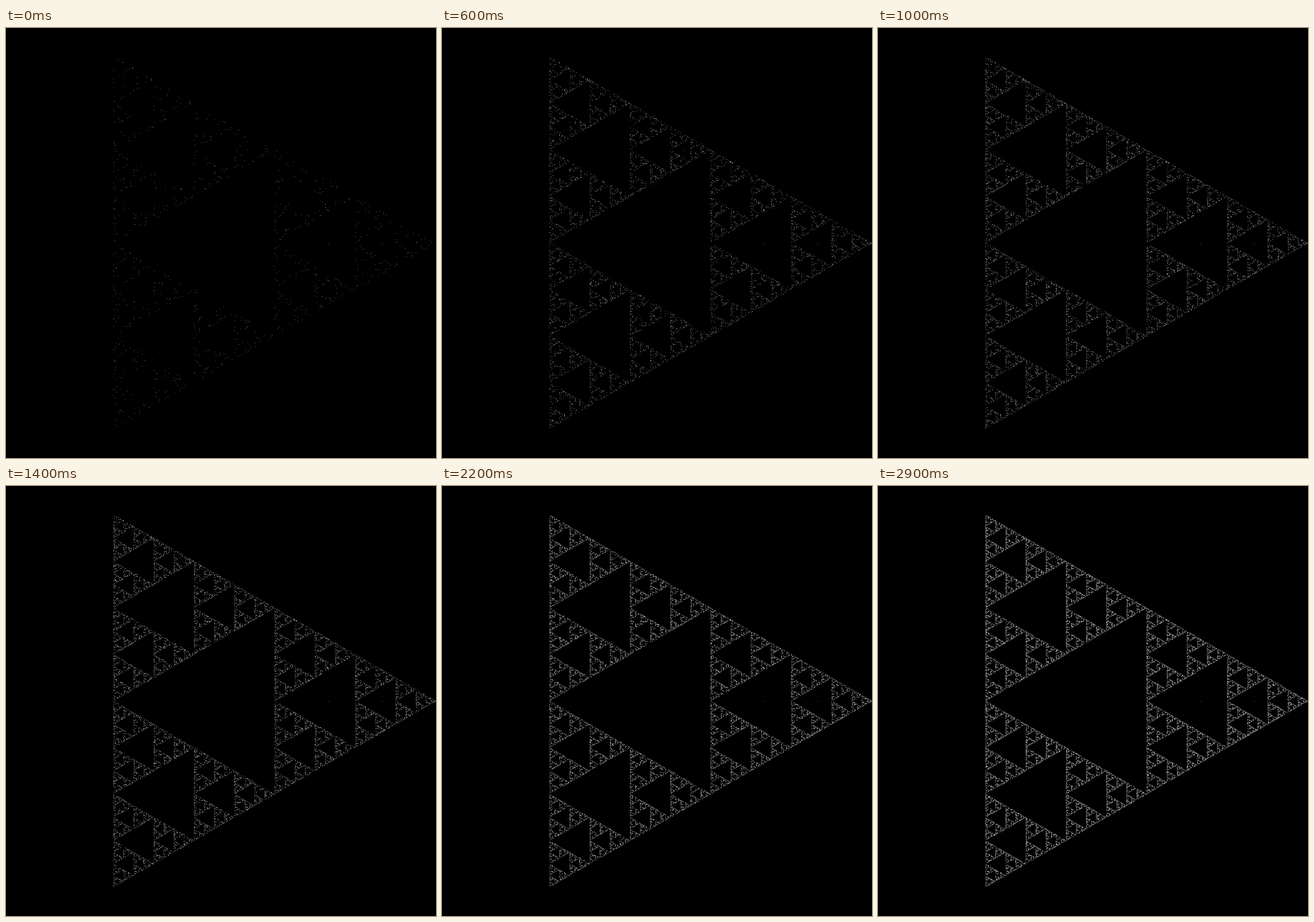
Write an HTML page with a canvas that moves like this. It is 748 by 748 pixels and loops after 3000 ms.

```html
<!DOCTYPE html>
<html lang="en">
<head>
<meta charset="utf-8">
<title>Chaos game triangle</title>
<style>
html, body { margin: 0; width: 100%; height: 100%; overflow: hidden; background: #000; }
canvas { display: block; width: 748px; height: 748px; }
</style>
</head>
<body>
<canvas id="stage" width="748" height="748"></canvas>
<script>
const SIZE = 748, HALF = SIZE / 2;
const LOOP = 3000, STEP = 100, PER_STEP = 1000;
const BLACK = 0xff000000, ALPHA = 100 / 255;

const ctx = document.getElementById('stage').getContext('2d');
const image = ctx.createImageData(SIZE, SIZE);
const pixels = new Uint32Array(image.data.buffer);

function seeded(seed) {
  return () => {
    seed = (seed + 0x6d2b79f5) | 0;
    let t = Math.imul(seed ^ (seed >>> 15), 1 | seed);
    t = (t + Math.imul(t ^ (t >>> 7), 61 | t)) ^ t;
    return ((t ^ (t >>> 14)) >>> 0) / 4294967296;
  };
}

// Corners: right, bottom left, top left
const corners = [0, 1, 2].map(i => {
  const a = i * Math.PI * 2 / 3;
  return [HALF + HALF * Math.cos(a), HALF + HALF * Math.sin(a)];
});

// Each point lies halfway between the previous one and a random corner
function chaosGame(count) {
  const rand = seeded(20);
  const opening = [0, 0, 2];
  const cells = new Uint32Array(count);
  let x = HALF, y = HALF;
  for (let i = 0; i < count; i++) {
    const [cx, cy] = corners[opening[i] ?? Math.floor(rand() * 3)];
    x = (x + cx) / 2;
    y = (y + cy) / 2;
    cells[i] = Math.floor(y + 1e-6) * SIZE + Math.min(SIZE - 1, Math.floor(x + 1e-6));
  }
  return cells;
}

const cells = chaosGame(LOOP / STEP * PER_STEP);
let shown = -1;

// Lay one translucent white dot over a grey pixel
function addDot(cell) {
  const old = pixels[cell] & 255;
  const grey = Math.round(old + (255 - old) * ALPHA);
  pixels[cell] = BLACK | grey * 0x010101;
}

function draw(time) {
  const step = Math.floor((time % LOOP) / STEP);
  if (step === shown) return;
  shown = step;
  pixels.fill(BLACK);
  cells.subarray(0, (step + 1) * PER_STEP).forEach(addDot);
  ctx.putImageData(image, 0, 0);
}

let start = null;
function tick(now) {
  start ??= now;
  draw(Math.max(0, now - start));
  requestAnimationFrame(tick);
}
draw(0);
requestAnimationFrame(tick);
</script>
</body>
</html>
```
